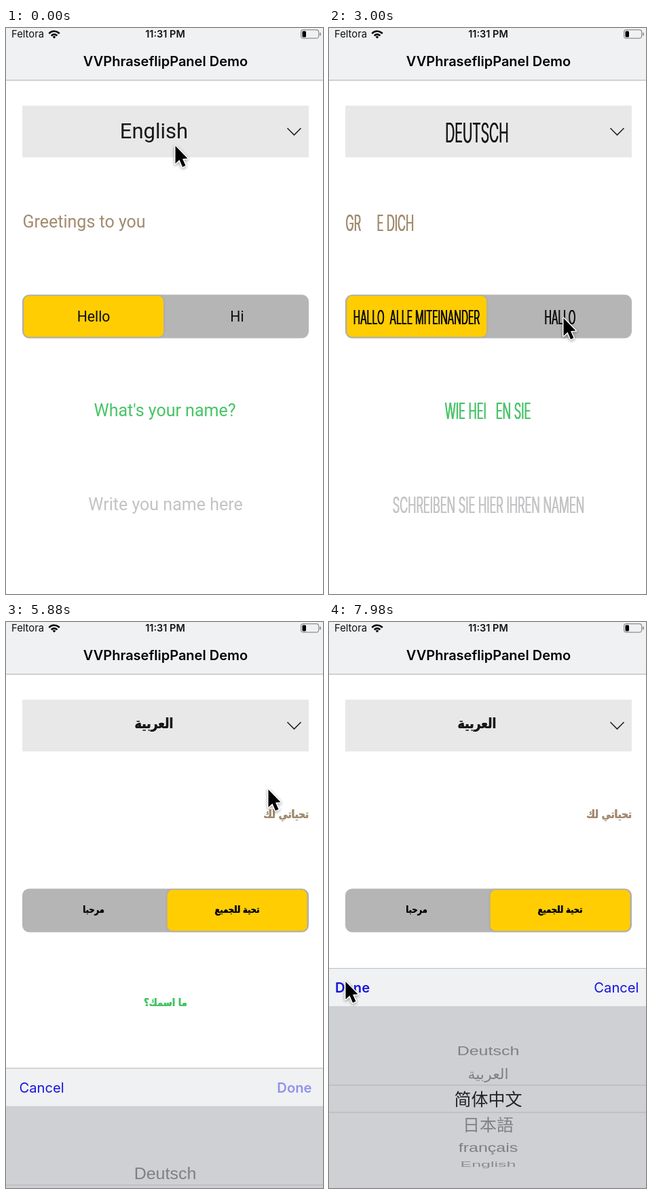
An HTML page with a canvas for the animation above (8 s loop, 467 by 831 pixels).

```html
<!DOCTYPE html>
<html lang="en">
<head>
<meta charset="utf-8">
<title>Language picker</title>
<style>
  html, body { margin: 0; width: 100%; height: 100%; overflow: hidden; background: #fff; }
  canvas { display: block; width: 100vw; height: 100vh; }
</style>
</head>
<body>
<canvas id="stage"></canvas>
<script>
const W = 467, H = 831, LOOP = 8000;
const canvas = document.getElementById('stage');
const ctx = canvas.getContext('2d');
const dpr = window.devicePixelRatio || 1;
canvas.width = Math.round(W * dpr);
canvas.height = Math.round(H * dpr);

const UI = 'Inter, sans-serif';
const WHEEL = '"Liberation Sans", "DejaVu Sans", "Noto Sans CJK SC", "Noto Sans CJK", sans-serif';

// sizes and baselines run: menu, greeting, segments, question, placeholder
const LANGS = {
  en: {
    weight: 400, family: 'Roboto, sans-serif', squeeze: 1, thicken: 0,
    sizes: [31, 25, 21.2, 25, 25], lines: [162, 293, 431, 570, 708],
    menu: 'English', greeting: 'Greetings to you', segments: ['Hello', 'Hi'],
    question: "What's your name?", hint: 'Write you name here'
  },
  de: {
    weight: 300, family: 'Inter, sans-serif', squeeze: 0.5, thicken: 1,
    sizes: [39, 33, 28, 33, 33], lines: [168, 298, 435, 574, 712],
    menu: 'DEUTSCH', greeting: 'GR     E DICH', segments: ['HALLO  ALLE MITEINANDER', 'HALLO'],
    question: 'WIE HEI   EN SIE', hint: 'SCHREIBEN SIE HIER IHREN NAMEN'
  },
  ar: {
    weight: 700, family: '"DejaVu Sans", sans-serif', squeeze: 0.82, thicken: 0.4, rtl: true,
    sizes: [21, 16.5, 14, 16, 16], lines: [156, 288, 427, 564, 702],
    menu: 'العربية', greeting: 'تحياتي لك', segments: ['مرحبا', 'تحية للجميع'],
    question: 'ما اسمك؟', hint: 'اكتب اسمك هنا'
  }
};
const ROWS = ['Deutsch', 'العربية', '简体中文', '日本語', 'français', 'English'];

// each visit of the picker: when it opens, closes and scrolls to which row
const VISITS = [
  { open: 400, close: 1885, row: 0, from: 0, to: 1 },
  { open: 4180, close: 5797, row: 1, from: 4680, to: 5080 },
  { open: 6540, close: Infinity, row: 2, from: 6980, to: 7650, rtl: true }
];

const POINTER = [
  [0, 249, 172], [250, 249, 172], [780, 264, 188], [1350, 425, 536], [1750, 425, 536],
  [2040, 379, 491], [2700, 345, 425], [3250, 345, 425], [4020, 303, 140], [4180, 303, 140],
  [4620, 290, 705], [4950, 288, 667], [5300, 422, 535], [5600, 422, 535], [5880, 386, 245],
  [6200, 310, 160], [6450, 310, 160], [6900, 292, 709], [6980, 292, 709], [7350, 290, 636],
  [7480, 290, 636], [7920, 24, 527], [LOOP, 24, 527]
];

const mix = (a, b, k) => a + (b - a) * k;
const ramp = (t, a, b) => Math.min(1, Math.max(0, (t - a) / (b - a)));
const smooth = k => k * k * (3 - 2 * k);
const spring = ms => {
  if (ms <= 0) return 0;
  const x = 0.0183 * ms;
  return 1 - (1 + x) * Math.exp(-x);
};

function rect(x, y, w, h, color, radius = 0) {
  ctx.fillStyle = color;
  ctx.beginPath();
  ctx.roundRect(x, y, w, h, radius);
  ctx.fill();
}

function polyline(points, color, width) {
  ctx.beginPath();
  points.forEach(([x, y]) => ctx.lineTo(x, y));
  ctx.strokeStyle = color;
  ctx.lineWidth = width;
  ctx.stroke();
}

function text(str, x, y, size, color, { weight = 400, family = UI, align = 'center', rtl = false } = {}) {
  ctx.font = `${weight} ${size}px ${family}`;
  ctx.textAlign = align;
  ctx.direction = rtl ? 'rtl' : 'ltr';
  ctx.fillStyle = color;
  ctx.fillText(str, x, y);
}

// text in the typeface of the current language; narrow lettering gets thicker stems
function localText(lang, str, x, slot, color, align) {
  ctx.save();
  ctx.translate(x, lang.lines[slot]);
  ctx.scale(lang.squeeze, 1);
  const shifts = lang.thicken ? [-lang.thicken, 0, lang.thicken] : [0];
  for (const dx of shifts) text(str, dx, 0, lang.sizes[slot], color, { ...lang, align });
  ctx.restore();
}

function drawHeader() {
  rect(0, 0, W, 76, '#f0f1f3');
  rect(0, 76, W, 1.2, '#b9babd');
  text('Feltora', 8, 14, 14.8, '#111', { align: 'left' });
  text('11:31 PM', 234.5, 14, 14.5, '#111', { weight: 600 });
  text('VVPhraseflipPanel Demo', 235, 56, 20, '#000', { weight: 600 });

  ctx.strokeStyle = '#000';
  ctx.lineWidth = 2.6;
  for (const r of [5.6, 10.2]) {
    ctx.beginPath();
    ctx.arc(71, 15, r, -Math.PI * 0.77, -Math.PI * 0.23);
    ctx.stroke();
  }
  ctx.fillStyle = '#000';
  ctx.beginPath();
  ctx.moveTo(71, 15.5);
  ctx.arc(71, 15, 3, -Math.PI * 0.77, -Math.PI * 0.23);
  ctx.fill();

  ctx.strokeStyle = '#8e8e90';
  ctx.lineWidth = 1.2;
  ctx.beginPath();
  ctx.roundRect(434.6, 2.6, 26, 12.6, 3.5);
  ctx.stroke();
  rect(436.5, 4.5, 5.5, 9, '#000', 1.5);
  rect(462, 6.5, 1.8, 5, '#8e8e90', 1);
}

function drawForm(t) {
  const lang = t < VISITS[0].close ? LANGS.en : t < VISITS[1].close ? LANGS.de : LANGS.ar;

  rect(24, 114, 422, 76, '#e8e8e9', 1);
  localText(lang, lang.menu, 218, 0, '#17181a', 'center');
  polyline([[414.5, 147], [424.5, 157], [434.5, 147]], '#222', 1.6);

  localText(lang, lang.greeting, lang.rtl ? 446 : 24.5, 1, '#a18b6f', lang.rtl ? 'right' : 'left');

  rect(24, 391.5, 422, 64, '#b5b5b6', 10);
  ctx.save();
  ctx.shadowColor = 'rgba(0,0,0,.12)';
  ctx.shadowBlur = 4 * dpr;
  rect(mix(26.2, 237.6, smooth(ramp(t, 3180, 3440))), 393.3, 206, 60.3, '#ffcd02', 8);
  ctx.restore();
  localText(lang, lang.segments[0], 129, 2, '#0c0c0c', 'center');
  localText(lang, lang.segments[1], 340.5, 2, '#0c0c0c', 'center');

  localText(lang, lang.question, lang.rtl ? 235 : 234, 3, '#47c466', 'center');
  localText(lang, lang.hint, 235, 4, '#c3c3c5', 'center');
}

function drawWheel(top, position) {
  const radius = 108, step = 0.36, middle = top + 192.5;
  rect(0, top + 171.5, W, 1, '#b2b3b7');
  rect(0, top + 211.5, W, 1, '#b2b3b7');
  ROWS.forEach((label, i) => {
    const angle = (i - position) * step;
    if (Math.abs(angle) > 1.5) return;
    const distance = Math.abs(i - position);
    const alpha = distance < 1 ? mix(0.9, 0.42, ramp(distance, 0.3, 0.7)) : mix(0.42, 0.28, ramp(distance, 2, 4));
    ctx.save();
    ctx.translate(234.5, middle + radius * Math.sin(angle));
    ctx.scale(1, Math.cos(angle));
    text(label, 0, 9, i === 1 ? 22 : 25, `rgba(15,16,20,${alpha})`, { family: WHEEL, rtl: i === 1 });
    ctx.restore();
  });
}

function drawPicker(t) {
  const visit = VISITS.filter(v => t >= v.open).pop();
  if (!visit) return;
  const shown = spring(t - visit.open) - spring(t - visit.close);
  const top = H - 323 * shown;
  if (top > H - 0.5) return;

  rect(0, top, W, H - top, '#cfd0d4');
  rect(0, top, W, 56, '#f0f1f3');
  rect(0, top, W, 1, '#bcbdc0');
  const blue = '#1515df', baseline = top + 36;
  const [cancelX, cancelAlign, doneX, doneAlign] = visit.rtl
    ? [456.5, 'right', 9, 'left']
    : [19.5, 'left', 450.5, 'right'];
  text('Cancel', cancelX, baseline, 20.2, blue, { align: cancelAlign });
  ctx.globalAlpha = t < visit.close ? 1 : mix(0.15, 1, ramp(t, visit.close, visit.close + 255));
  text('Done', doneX, baseline, 20.2, blue, { weight: 600, align: doneAlign });
  ctx.globalAlpha = 1;
  drawWheel(top, visit.row * smooth(ramp(t, visit.from, visit.to)));
}

function drawPointer(t) {
  const next = Math.max(1, POINTER.findIndex(p => p[0] > t));
  const [t0, x0, y0] = POINTER[next - 1], [t1, x1, y1] = POINTER[next];
  const k = smooth(ramp(t, t0, t1));
  ctx.save();
  ctx.translate(mix(x0, x1, k), mix(y0, y1, k));
  ctx.beginPath();
  [[0.5, 1], [0.5, 27], [6.5, 21.5], [11, 32], [15.5, 30], [11, 20], [18.5, 19.5]]
    .forEach(([x, y]) => ctx.lineTo(x, y));
  ctx.closePath();
  ctx.lineJoin = 'round';
  ctx.lineWidth = 3;
  ctx.strokeStyle = '#fff';
  ctx.shadowColor = 'rgba(0,0,0,.4)';
  ctx.shadowBlur = 4 * dpr;
  ctx.shadowOffsetY = 1.5 * dpr;
  ctx.stroke();
  ctx.shadowColor = 'transparent';
  ctx.fillStyle = '#000';
  ctx.fill();
  ctx.restore();
}

function frame() {
  const t = performance.now() % LOOP;
  ctx.setTransform(canvas.width / W, 0, 0, canvas.height / H, 0, 0);
  rect(0, 0, W, H, '#fff');
  drawHeader();
  drawForm(t);
  drawPicker(t);
  drawPointer(t);
  requestAnimationFrame(frame);
}
frame();
</script>
</body>
</html>
```
